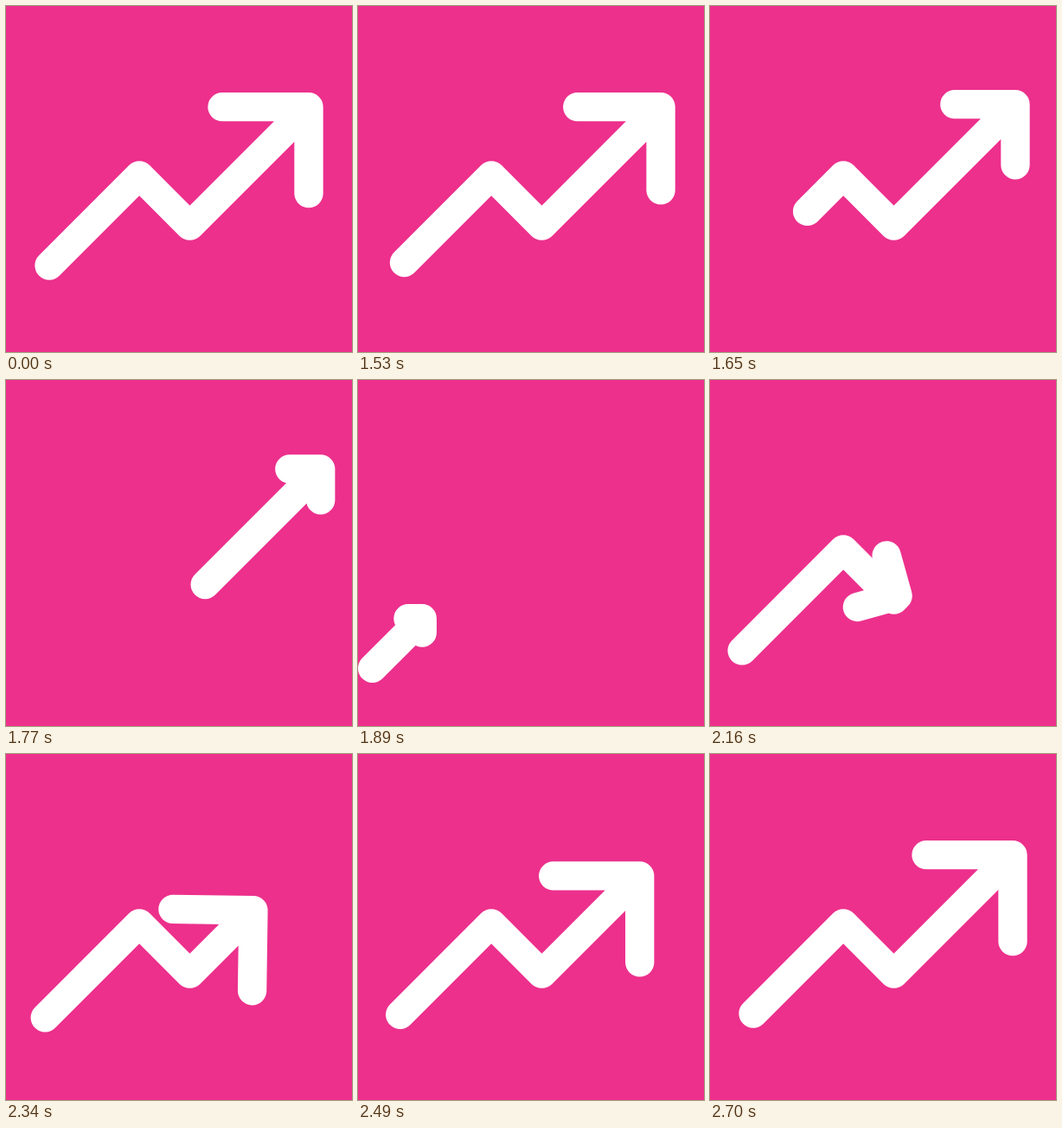
Write an HTML page that moves like this. It is 400 px wide and 400 px high and loops after 2.73 s.

```html
<!DOCTYPE html>
<html lang="en">
<head>
<meta charset="utf-8">
<title>Rising arrow</title>
<style>
  html, body { margin: 0; height: 100%; overflow: hidden; background: #ec308c; }
  svg { display: block; width: 100vw; height: 100vh; }
  path { fill: none; stroke: #fff; stroke-width: 2; stroke-linecap: round; stroke-linejoin: round; }
</style>
</head>
<body>
<svg viewBox="0 0 24 24">
  <path id="leaving"/>
  <path id="arriving"/>
</svg>
<script>
  const LOOP = 2730, STEP = 30;
  const START = 1, END = 23, TAIL = 3, TIP = 21, ARM = 6;
  const PEAK = 9.25, DIP = 12.75;

  const leaving = document.getElementById('leaving');
  const arriving = document.getElementById('arriving');

  const mix = (a, b, p) => a + (b - a) * p;
  const span = (t, a, b) => Math.min(1, Math.max(0, (t - a) / (b - a)));
  const easeOut = (u, n) => 1 - (1 - u) ** n;
  const smooth = u => u * u * (3 - 2 * u);

  // Height of the zigzag track; every leg runs at 45 degrees
  const trackY = x => x < PEAK ? 21 - x : x < DIP ? 2.5 + x : 28 - x;
  const point = (x, y) => `${x.toFixed(3)} ${y.toFixed(3)}`;

  function arrow(tail, tip, arm, turn) {
    const corners = [PEAK, DIP].filter(x => x > tail && x < tip);
    const body = [tail, ...corners, tip].map(x => point(x, trackY(x)));
    const y = trackY(tip), c = arm * Math.cos(turn), s = arm * Math.sin(turn);
    const head = [point(tip - c, y - s), point(tip, y), point(tip - s, y + c)];
    return `M${body.join('L')}M${head.join('L')}`;
  }

  function leave(t) {
    if (t >= 1880) return '';
    const u = span(t, 1500, 1880);
    return arrow(
      mix(TAIL, END, u ** 1.8),
      mix(TIP, END, u ** 2.6),
      ARM * (1 - u ** 1.3),
      0
    );
  }

  const armKeys = [[1800, 0], [2010, 0.38], [2160, 0.485], [2340, 0.93], [2460, 1]];

  function armGrowth(t) {
    let size = 0;
    for (let i = 1; i < armKeys.length; i++) {
      const [t0, a] = armKeys[i - 1], [t1, b] = armKeys[i];
      size += (b - a) * span(t, t0, t1);
    }
    return size;
  }

  function arrive(t) {
    if (t < 1800) return '';
    const swing = smooth(span(t, 2000, 2090)) - smooth(span(t, 2090, 2355));
    return arrow(
      mix(START, TAIL, easeOut(span(t, 1905, 2700), 2.45)),
      mix(START, TIP, easeOut(span(t, 1800, 2700), 1.8)),
      ARM * armGrowth(t),
      swing * Math.PI / 2
    );
  }

  function draw() {
    const t = Math.floor(performance.now() % LOOP / STEP) * STEP;
    leaving.setAttribute('d', leave(t));
    arriving.setAttribute('d', arrive(t));
    requestAnimationFrame(draw);
  }
  draw();
</script>
</body>
</html>
```
